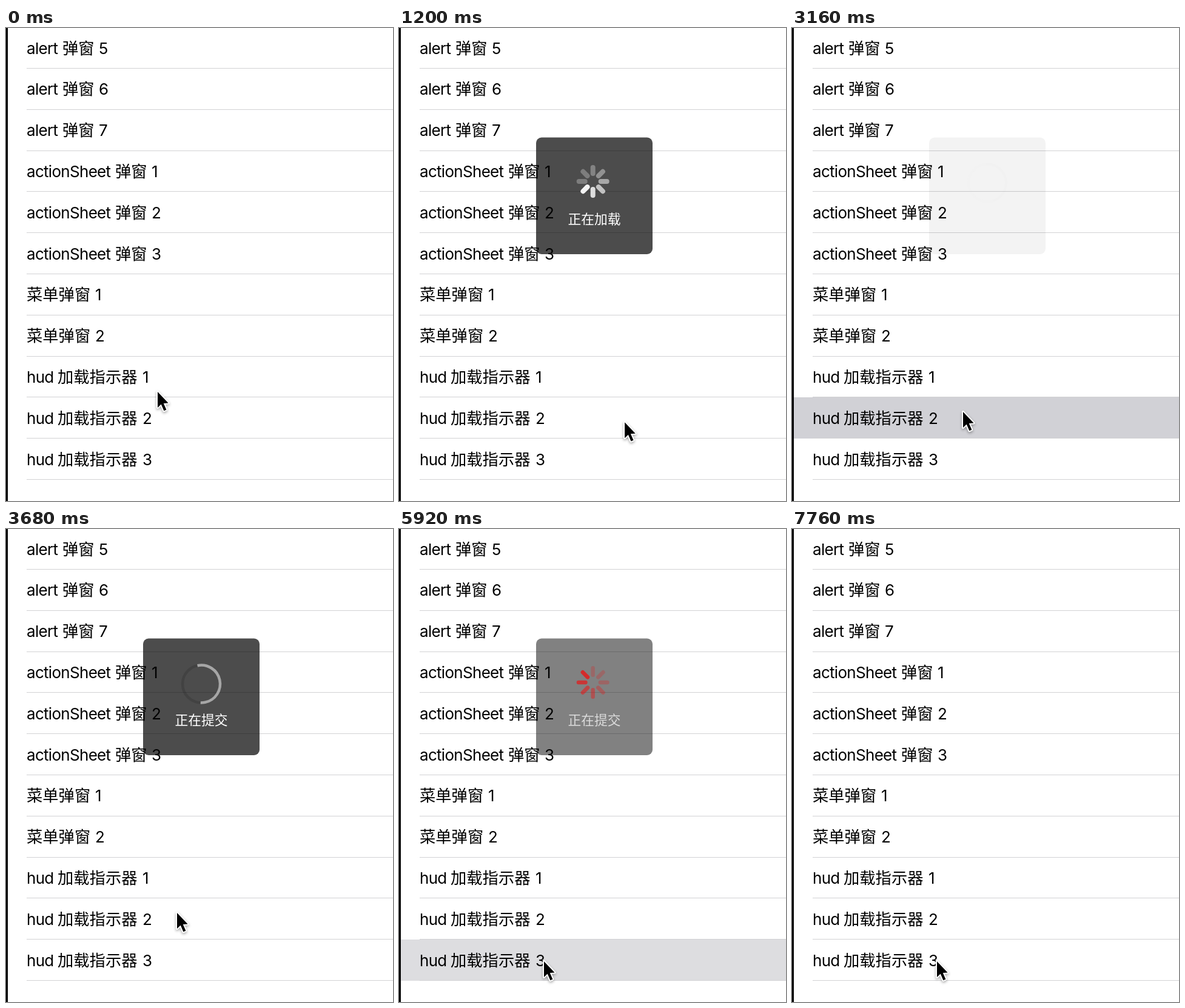
An HTML page with a canvas that plays this animation: 638x780 px, repeating every 7840 ms.

```html
<!DOCTYPE html>
<html lang="zh">
<head>
<meta charset="utf-8">
<title>HUD demo</title>
<style>
  html, body { margin: 0; width: 100%; height: 100%; overflow: hidden; background: #fff; }
  canvas { display: block; width: 638px; height: 780px; }
</style>
</head>
<body>
<canvas id="stage"></canvas>
<script>
const W = 638, H = 780, LOOP = 7840, STEP = 40;
const ROW_H = 67.8, FIRST_LINE = 66.5;
const LATIN = '26px Inter, Roboto, sans-serif';
const HAN = '26.3px "Noto Sans CJK SC", "Noto Sans CJK", sans-serif';
const HUD_FONT = '21.8px "Noto Sans CJK SC", "Noto Sans CJK", sans-serif';

const canvas = document.getElementById('stage');
const ctx = canvas.getContext('2d');
const dpr = window.devicePixelRatio || 1;
canvas.width = W * dpr;
canvas.height = H * dpr;

// Each row: latin word, han word and its x, number and its x.
const rows = [
  ...[5, 6, 7].map(n => ['alert', '弹窗', 93, n, 153]),
  ...[1, 2, 3].map(n => ['actionSheet', '弹窗', 180, n, 240]),
  ...[1, 2].map(n => ['', '菜单弹窗', 34, n, 147]),
  ...[1, 2, 3].map(n => ['hud', '加载指示器', 85, n, 225])
];

const huds = [
  { row: 8, press: 475, show: 475, hide: 2480, text: '正在加载', draw: t => spinner(t, '#fff', 8) },
  { row: 9, press: 2880, show: 3120, hide: 5100, text: '正在提交', draw: ring },
  { row: 10, press: 5560, show: 5760, hide: 7500, text: '正在提交', draw: t => spinner(t, '#f00', 6.5) }
];

// Pointer tip: time, x, y.
const path = [
  [0, 250, 600], [240, 246, 590], [440, 246, 590], [520, 246, 586],
  [700, 246, 586], [1160, 370, 650], [1480, 387, 652], [1800, 380, 650],
  [2040, 350, 647], [2280, 320, 645], [2400, 320, 645], [2720, 282, 633],
  [4960, 282, 633], [5140, 316, 653], [5260, 317, 680], [5360, 297, 698],
  [5520, 239, 713], [LOOP, 239, 713]
];

const arrow = [[0, 0], [0, 16.2], [3.6, 12.8], [6.5, 19.5], [9, 18.4], [6.1, 11.8], [11, 11.6]];

function ease(start, length, t) {
  const p = Math.min(1, Math.max(0, (t - start) / length));
  return p * p * (3 - 2 * p);
}

function write(text, x, y, font, spacing) {
  ctx.font = font;
  ctx.letterSpacing = spacing || '0px';
  ctx.fillText(text, x, y);
}

function drawList(t) {
  for (const h of huds) {
    if (t < h.press) continue;
    const alpha = 1 - ease(h.show, 480, t);
    if (!alpha) continue;
    ctx.globalAlpha = alpha;
    ctx.fillStyle = '#d1d1d6';
    ctx.fillRect(3, Math.round(FIRST_LINE + ROW_H * (h.row - 1)), W, 68);
    ctx.globalAlpha = 1;
  }
  rows.forEach(([latin, han, hanX, num, numX], i) => {
    const base = 42.5 + ROW_H * i;
    ctx.fillStyle = '#d2d2d4';
    ctx.fillRect(34, Math.floor(FIRST_LINE + ROW_H * i), W, 1);
    ctx.fillStyle = '#000';
    write(latin, 34, base, LATIN, '-0.7px');
    write(han, hanX, base, HAN);
    write(num, numX, base, LATIN);
  });
}

// Eight spokes; the bright head moves on every 100 ms with a short blend.
function spinner(age, color, width) {
  const glow = [0.94, 0.82, 0.66, 0.51, 0.39, 0.31, 0.28, 0.28];
  const pos = (age - 180) / 100;
  const head = Math.floor(pos);
  const mix = Math.min(1, (pos - head) * 4);
  const level = k => glow[((k % 8) + 8) % 8];
  const base = ctx.globalAlpha;
  ctx.fillStyle = color;
  for (let i = 0; i < 8; i++) {
    const now = level(head - i), before = level(head - 1 - i);
    ctx.save();
    ctx.translate(319.7, 253);
    ctx.rotate(i * Math.PI / 4);
    ctx.globalAlpha = base * (before + (now - before) * mix);
    ctx.beginPath();
    ctx.roundRect(-width / 2, -27, width, 18, width / 2);
    ctx.fill();
    ctx.restore();
  }
}

function ring(age) {
  const start = (-102 + (age - 560) * 0.36) * Math.PI / 180;
  const arc = (from, to, color) => {
    ctx.beginPath();
    ctx.arc(322, 255.5, 31, from, to);
    ctx.strokeStyle = color;
    ctx.stroke();
  };
  ctx.lineWidth = 4.5;
  arc(0, Math.PI * 2, 'rgba(0,0,0,0.13)');
  arc(start, start + Math.PI * 1.08, 'rgba(255,255,255,0.53)');
}

function drawHud(h, t) {
  const alpha = ease(h.show, 250, t) - ease(h.hide, 250, t);
  if (alpha <= 0) return;
  ctx.save();
  ctx.globalAlpha = alpha;
  ctx.fillStyle = 'rgba(0,0,0,0.7)';
  ctx.beginPath();
  ctx.roundRect(226, 180.5, 192, 192.5, 9);
  ctx.fill();
  h.draw(t - h.show);
  ctx.fillStyle = '#fff';
  ctx.textAlign = 'center';
  write(h.text, 322, 323, HUD_FONT);
  ctx.restore();
}

function drawPointer(t) {
  const i = path.findIndex(k => k[0] > t);
  const [t0, x0, y0] = path[i - 1], [t1, x1, y1] = path[i];
  const p = (t - t0) / (t1 - t0);
  ctx.save();
  ctx.translate(x0 + (x1 - x0) * p, y0 + (y1 - y0) * p);
  ctx.beginPath();
  arrow.forEach(([x, y]) => ctx.lineTo(x * 1.6, y * 1.6));
  ctx.closePath();
  ctx.lineJoin = 'round';
  ctx.lineWidth = 4;
  ctx.strokeStyle = '#fff';
  ctx.shadowColor = 'rgba(0,0,0,0.35)';
  ctx.shadowBlur = 4 * dpr;
  ctx.shadowOffsetY = 2 * dpr;
  ctx.stroke();
  ctx.shadowColor = 'transparent';
  ctx.fillStyle = '#000';
  ctx.fill();
  ctx.restore();
}

function render(t) {
  ctx.setTransform(dpr, 0, 0, dpr, 0, 0);
  ctx.fillStyle = '#fff';
  ctx.fillRect(0, 0, W, H);
  drawList(t);
  ctx.fillStyle = '#000';
  ctx.fillRect(0, 0, 3, H);
  huds.forEach(h => drawHud(h, t));
  drawPointer(t);
}

const begin = performance.now();
function tick() {
  const t = (performance.now() - begin) % LOOP;
  render(Math.floor(t / STEP) * STEP);
  requestAnimationFrame(tick);
}
tick();
</script>
</body>
</html>
```
